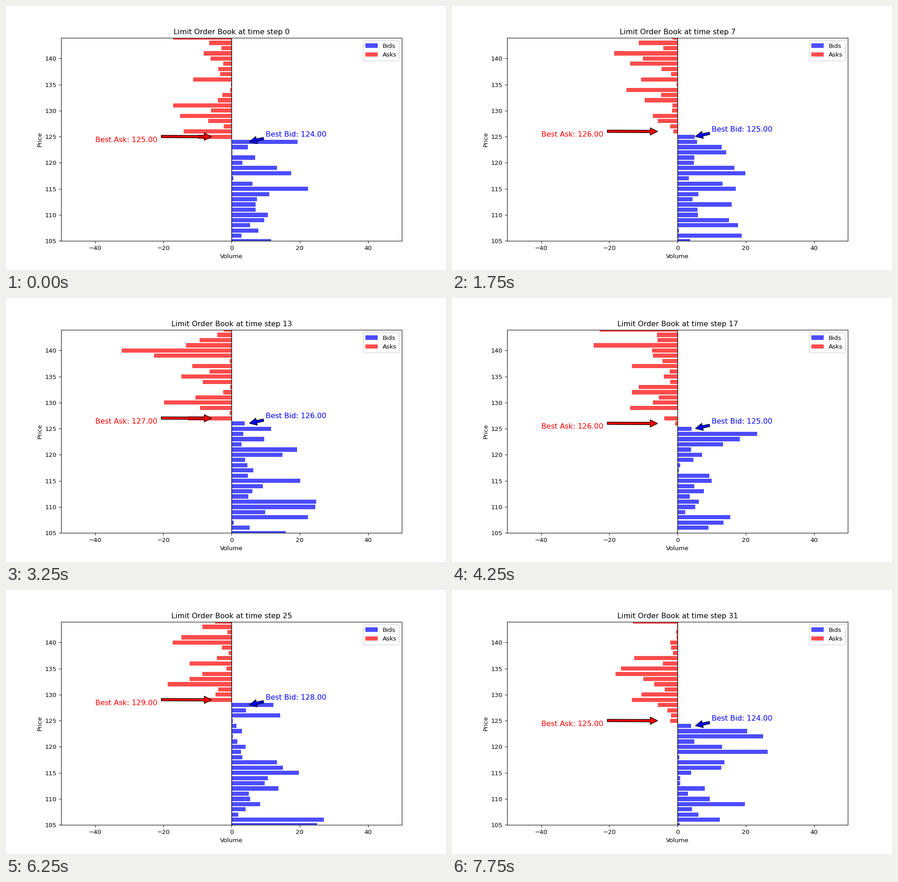
A matplotlib script that plays this animation: 966x580 px, repeating every 8000 ms.

```python
import numpy as np
import matplotlib.pyplot as plt
from matplotlib.animation import FuncAnimation
from matplotlib.patches import Patch

STEPS = 32
INTERVAL = 250
LEVELS = np.arange(105, 145)
SPREAD = 1
MAX_VOLUME = 32.4

# Key points of the best ask; the steps between are interpolated.
ASK_PATH = {0: 125, 4: 125, 10: 127, 17: 126, 21: 125, 25: 129, 31: 125}


def best_ask(step):
    return int(round(np.interp(step, list(ASK_PATH), list(ASK_PATH.values()))))


def volumes(step):
    rng = np.random.default_rng(100 + step)
    return np.minimum(np.abs(rng.normal(0, 10, len(LEVELS))), MAX_VOLUME)


def make_label(color):
    return ax.annotate("", xy=(0, 125), xytext=(0, 125), color=color,
                       fontsize=12,
                       arrowprops=dict(facecolor=color, shrink=0.05))


def place_label(label, text, tip, pos):
    label.set_text(text)
    label.xy = tip
    label.set_position(pos)


def legend_patch(color, label):
    return Patch(facecolor=color, alpha=0.7, linewidth=0, label=label)


plt.rcParams["font.family"] = "DejaVu Sans"
fig, ax = plt.subplots(figsize=(10, 580 / 96.6), dpi=96.6)
bars = ax.barh(LEVELS, np.zeros(len(LEVELS)), height=0.8, alpha=0.7)
ax.axvline(0, color="black", linewidth=1)
ax.set_xlim(-50, 50)
ax.set_ylim(LEVELS[0], LEVELS[-1])
ax.set_xlabel("Volume")
ax.set_ylabel("Price")
ax.legend(handles=[legend_patch("blue", "Bids"), legend_patch("red", "Asks")],
          loc="upper right")
title = ax.set_title("")
bid_label = make_label("blue")
ask_label = make_label("red")


def update(step):
    ask = best_ask(step)
    bid = ask - SPREAD
    for bar, price, vol in zip(bars, LEVELS, volumes(step)):
        is_ask = price >= ask
        bar.set_width(-vol if is_ask else vol)
        bar.set_facecolor("red" if is_ask else "blue")
    place_label(bid_label, f"Best Bid: {bid:.2f}", (5, bid), (10, bid + 1))
    place_label(ask_label, f"Best Ask: {ask:.2f}", (-5, ask), (-40, ask - 1))
    title.set_text(f"Limit Order Book at time step {step}")
    return [*bars, bid_label, ask_label, title]


anim = FuncAnimation(fig, update, frames=STEPS, interval=INTERVAL,
                     repeat=True, repeat_delay=0, blit=False)
plt.show()
```
